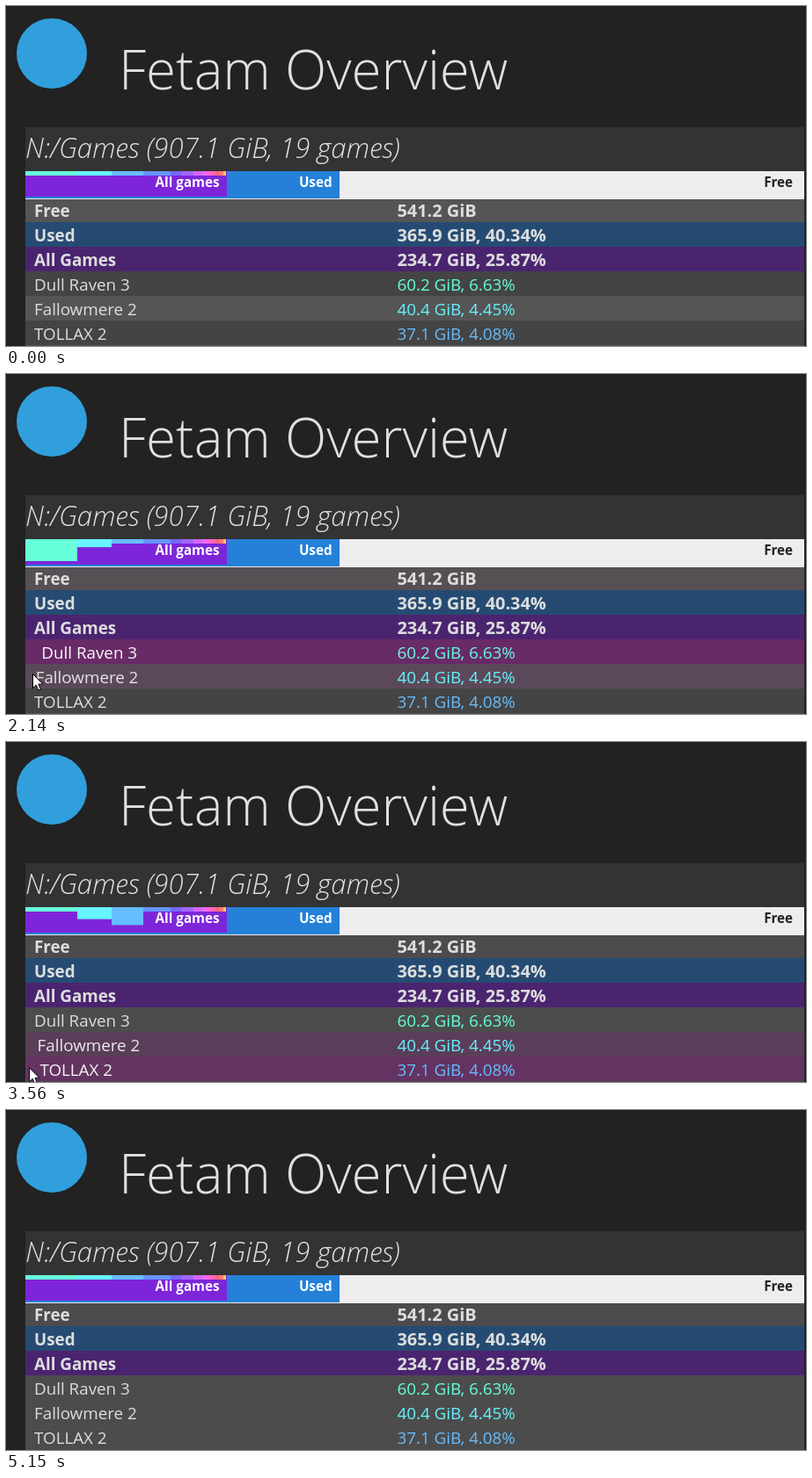
An HTML page for the animation above (7020 ms loop, 909 by 387 pixels).

```html
<!DOCTYPE html>
<html lang="en">
<head>
<meta charset="utf-8">
<title>Drive overview</title>
<style>
  html, body { margin: 0; width: 100%; height: 100%; overflow: hidden; background: #222; }
  svg { display: block; width: 909px; height: 387px; }
  text { font: 18.8px "Open Sans", "Noto Sans", sans-serif; fill: #ddd; white-space: pre; }
  .title { font-size: 61.8px; font-weight: 300; fill: #e0e0e0; }
  .path { font-size: 31.1px; font-weight: 300; font-style: italic; fill: #e0e0e0; }
  .tag { font-size: 15.2px; font-weight: 700; fill: #fff; text-anchor: end; }
  .bold { font-weight: 700; }
  .bold.value { font-size: 19.9px; }
</style>
</head>
<body>
<svg id="stage" viewBox="0 0 909 387"></svg>
<script>
const LOOP = 7020;
const HOVER = 500;
const LEFT = 22, RIGHT = 907, BAR_TOP = 188;
const stage = document.getElementById('stage');

function add(tag, attrs, parent = stage) {
  const el = document.createElementNS('http://www.w3.org/2000/svg', tag);
  for (const key in attrs) el.setAttribute(key, attrs[key]);
  parent.append(el);
  return el;
}
const rect = (x, y, width, height, fill) => add('rect', { x, y, width, height, fill });
function label(x, y, string, cls = '', fill) {
  const el = add('text', { x, y, class: cls });
  el.textContent = string;
  if (fill) el.style.fill = fill;
  return el;
}

// steps: [time in ms, properties, easing towards the next step]
function play(el, steps, easing = 'linear') {
  const full = [[0, steps[0][1]], ...steps, [LOOP, steps.at(-1)[1]]];
  el.animate(
    full.map(([time, props, ease = easing]) => ({ offset: time / LOOP, easing: ease, ...props })),
    { duration: LOOP, iterations: Infinity });
}
function hover(el, [enter, leave], off, on) {
  play(el, [
    [enter, off, 'ease'], [enter + HOVER, on],
    [leave, on, 'ease'], [leave + HOVER, off]
  ]);
}

// Header
add('circle', { cx: 52, cy: 54, r: 40, fill: '#309fdc' });
label(128, 95, 'Fetam Overview', 'title');
rect(LEFT, 138, RIGHT - LEFT, 249, '#333');
label(LEFT, 172.5, 'N:/Games (907.1 GiB, 19 games)', 'path');

// Rows
const light = [[0, { fill: '#555' }], [1900, { fill: '#565055' }], [2530, { fill: '#4c4c4c' }]];
const dark = [[0, { fill: '#444' }], [2530, { fill: '#4c4c4c' }]];
const rows = [
  { name: 'Free', value: '541.2 GiB', stripe: light },
  { name: 'Used', value: '365.9 GiB, 40.34%', fill: '#254b73' },
  { name: 'All Games', value: '234.7 GiB, 25.87%', fill: '#4b2470' },
  { name: 'Dull Raven 3', value: '60.2 GiB, 6.63%', stripe: dark, color: '#66ffd9', span: [820, 2070] },
  { name: 'Fallowmere 2', value: '40.4 GiB, 4.45%', stripe: light, color: '#66f2ff', span: [2070, 3375] },
  { name: 'TOLLAX 2', value: '37.1 GiB, 4.08%', stripe: dark, color: '#66bdff', span: [3375, 4600] },
  { stripe: light }
];
rows.forEach(({ name, value, stripe, fill, color, span }, i) => {
  const top = 218 + 28 * i;
  const back = rect(LEFT, top, RIGHT - LEFT, 28, fill);
  if (stripe) play(back, stripe, 'step-end');
  if (!name) return;
  if (span) hover(rect(LEFT, top, RIGHT - LEFT, 28, '#722670'), span, { opacity: 0 }, { opacity: 1 });
  const weight = span ? '' : 'bold';
  const text = label(32, top + 22, name, weight);
  label(444.5, top + 22, value, weight + ' value', color);
  if (span) hover(text, span,
    { transform: 'translateX(0px)', fill: '#ddd' },
    { transform: 'translateX(10px)', fill: '#fff' });
});

// Usage bar
rect(LEFT, BAR_TOP, RIGHT - LEFT, 32, '#ededed');
rect(LEFT, BAR_TOP, 357, 31, '#2580d9');
rect(LEFT, BAR_TOP, 229, 29, '#7d26d9');

const edges = [22, 81, 120, 156, 187, 200, 213, 224, 232, 238, 243, 247, 250];
const hues = [165, 184, 206, 221, 248, 264, 284, 308, 330, 350, 10, 38];
hues.forEach((hue, i) => {
  const part = rect(edges[i], BAR_TOP, edges[i + 1] - edges[i], 5, `hsl(${hue} 100% 70%)`);
  const row = rows[i + 3];
  if (row && row.span) hover(part, row.span, { height: '5px' }, { height: '29px' });
});
label(242.5, 206, 'All games', 'tag');
label(370.5, 206, 'Used', 'tag');
label(894, 206, 'Free', 'tag', '#222');

// Pointer
const at = (x, y) => ({ transform: `translate(${x}px, ${y}px)` });
const pointer = add('g', {});
const arrow = add('path', {
  d: 'M.5 .5V16.5L4.2 13L6.8 18.8L9.4 17.6L6.9 12H12Z',
  fill: '#fff', stroke: '#000', 'stroke-width': 1
}, pointer);
const beam = add('path', {
  d: 'M-3 -7.5H-1M1 -7.5H3M0 -7V7M-3 7.5H-1M1 7.5H3',
  fill: 'none', stroke: '#c4bcc4', 'stroke-width': 1
}, pointer);

play(pointer, [
  [680, at(2, 303)], [820, at(22, 306)], [960, at(41.5, 309)],
  [1150, at(41.5, 317)], [1430, at(41.5, 317), 'step-end'], [1460, at(36, 313)],
  [1860, at(36, 313)], [2070, at(32, 330)], [2140, at(30, 341)], [2260, at(29, 346)],
  [3210, at(29, 346)], [3375, at(27, 358)], [3440, at(26, 368)], [3600, at(26, 371)],
  [4400, at(26, 371)], [4600, at(26, 388)]
]);
const show = { opacity: 1 }, hide = { opacity: 0 };
play(arrow, [[0, hide], [680, show], [900, hide], [1460, show], [4600, hide]], 'step-end');
play(beam, [[0, hide], [900, show], [1460, hide]], 'step-end');
</script>
</body>
</html>
```
